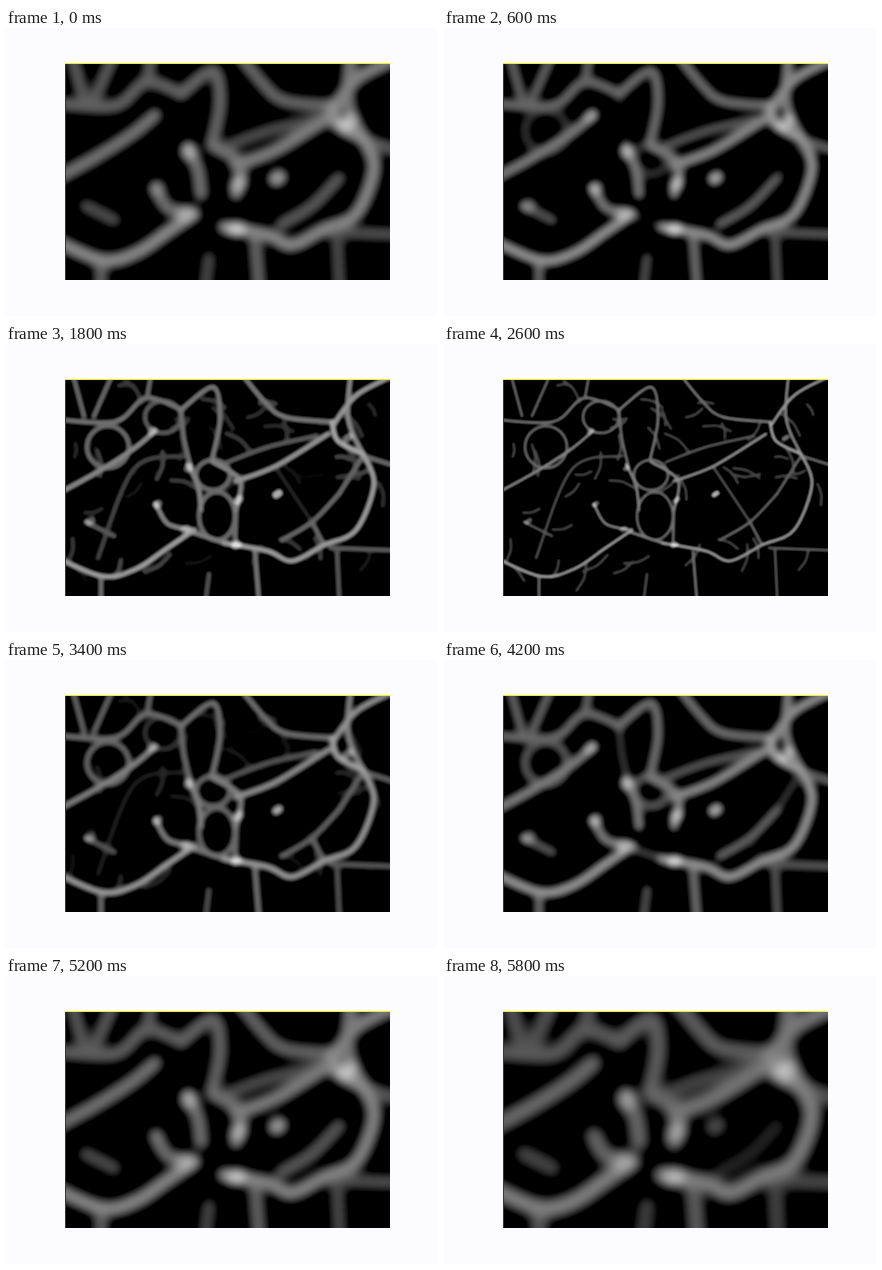
Animation, 432 px wide and 288 px high, one loop 6 s. Source, as an HTML page with a canvas:

```html
<!DOCTYPE html>
<html lang="en">
<head>
<meta charset="utf-8">
<title>Ridges at changing scale</title>
<style>
html, body { margin: 0; width: 100%; height: 100%; overflow: hidden; background: #fcfcff; }
canvas { display: block; }
</style>
</head>
<body>
<canvas id="stage" width="432" height="288"></canvas>
<script>
const W = 432, H = 288;
const BOX = [60, 36, 324, 216];
const STEP = 200, COUNT = 30, FINEST = 12.5;
const CUT = 17;

const stage = document.getElementById('stage').getContext('2d');
const layer = () => {
  const c = document.createElement('canvas');
  c.width = W;
  c.height = H;
  return c.getContext('2d', { willReadFrequently: true });
};
const sharp = layer(), soft = layer();
sharp.lineCap = sharp.lineJoin = 'round';

function seeded(seed) {
  return () => {
    seed = (seed * 1664525 + 1013904223) % 4294967296;
    return seed / 4294967296;
  };
}

// Smooth path through the points given as x, y, x, y ...
function through(p) {
  const path = new Path2D(), last = p.length / 2 - 1;
  const at = (i, axis) => p[2 * Math.max(0, Math.min(last, i)) + axis];
  const handle = (i, side, axis) =>
    at(i, axis) + side * (at(i + 1, axis) - at(i - 1, axis)) / 6;
  path.moveTo(p[0], p[1]);
  for (let i = 0; i < last; i++) {
    path.bezierCurveTo(
      handle(i, 1, 0), handle(i, 1, 1),
      handle(i + 1, -1, 0), handle(i + 1, -1, 1),
      at(i + 1, 0), at(i + 1, 1));
  }
  return path;
}

// ---- the network; reach is the scale at which a part has vanished ----
const parts = [];
const add = (path, level, reach, mode = 'lighten') => parts.push({ path, level, reach, mode });
const strand = (level, reach, ...p) => add(through(p), level, reach);
const spot = (x, y, level, reach) => add(through([x, y, x + 3, y - 2]), level, reach, 'lighter');
function ring(x, y, rx, ry, reach) {
  const path = new Path2D();
  path.ellipse(x, y, rx, ry, 0, 0, 2 * Math.PI);
  add(path, 72, reach);
}
const ALWAYS = 99;

// right half
strand(112, ALWAYS, 357, 110, 368, 140, 350, 186, 318, 201, 286, 217, 262, 207, 218, 199);
strand(108, ALWAYS, 400, 26, 352, 50, 328, 80);
strand(120, ALWAYS, 326, 78, 332, 97, 357, 110);
strand(95, ALWAYS, 346, 20, 342, 74, 357, 110);
strand(82, ALWAYS, 228, 20, 258, 57, 279, 73, 326, 78);
strand(105, ALWAYS, 322, 90, 270, 122, 230, 137);
strand(60, ALWAYS, 222, 118, 262, 103, 310, 92);
strand(70, ALWAYS, 358, 112, 405, 127);
strand(62, ALWAYS, 325, 204, 405, 207);
strand(58, ALWAYS, 331, 206, 334, 270);
strand(70, 18, 276, 196, 306, 178, 333, 150);
strand(70, 10, 333, 150, 357, 112);
strand(70, 9, 318, 201, 306, 178);
strand(55, 5, 306, 178, 270, 124);

// centre
strand(82, ALWAYS, 175, 66, 207, 43, 214, 75, 206, 116);
strand(92, ALWAYS, 182, 120, 192, 142, 195, 166);
strand(92, ALWAYS, 207, 118, 234, 136, 230, 166);
strand(80, ALWAYS, 249, 208, 254, 270);
strand(55, ALWAYS, 203, 230, 198, 270);
strand(75, 10, 175, 66, 178, 95, 184, 120);
strand(85, 10, 186, 188, 222, 200);
strand(75, 8, 230, 166, 229, 200);
ring(207, 131, 17, 15, 11);
ring(211, 172, 18, 24, 8);

// left half
strand(95, ALWAYS, 40, 156, 88, 130, 126, 106, 149, 87);
strand(115, ALWAYS, 40, 208, 95, 232, 130, 225, 160, 205, 188, 186);
strand(78, ALWAYS, 40, 74, 108, 78, 140, 54, 176, 66);
strand(70, ALWAYS, 78, 72, 64, 20);
strand(70, ALWAYS, 88, 72, 111, 20);
strand(70, ALWAYS, 141, 54, 147, 20);
strand(75, ALWAYS, 95, 232, 95, 270);
strand(90, ALWAYS, 150, 160, 162, 180, 188, 186);
strand(60, ALWAYS, 80, 178, 108, 192);
strand(55, 6, 92, 214, 128, 125, 178, 112);
ring(102, 103, 21, 21, 11);
ring(157, 73, 18, 16, 6);

spot(340, 95, 75, ALWAYS);
spot(229, 202, 70, ALWAYS);
spot(178, 186, 45, ALWAYS);
spot(181, 125, 60, ALWAYS);
spot(231, 157, 65, ALWAYS);
spot(270, 151, 130, 18);
spot(150, 161, 60, 14);
spot(83, 178, 60, 12);
spot(145, 88, 45, 12);

// fine fibres in the cells
const random = seeded(7);
for (let i = 0; i < 48; i++) {
  const x = 60 + 324 * random(), y = 36 + 216 * random();
  const turn = Math.PI * random(), size = 6 + 9 * random();
  const dx = size * Math.cos(turn), dy = size * Math.sin(turn);
  strand(48, 4 + 2.5 * random(), x - dx, y - dy, x + dy / 5, y - dx / 5, x + dx, y + dy);
}

// ---- drawing ----
const tone = v => v < CUT ? 0 : 255 * ((v - CUT) / (255 - CUT)) ** 0.75;

function draw(step) {
  const scale = Math.abs(step - FINEST);
  const width = 4 + 1.45 * scale;
  const gain = 1.3 - 0.02 * scale;

  sharp.globalCompositeOperation = 'source-over';
  sharp.fillStyle = '#000';
  sharp.fillRect(0, 0, W, H);
  for (const { path, level, reach, mode } of parts) {
    const fade = Math.max(0, Math.min(1, (reach - scale) / 3));
    if (!fade) continue;
    const v = Math.round(level * gain * fade);
    sharp.globalCompositeOperation = mode;
    sharp.strokeStyle = `rgb(${v},${v},${v})`;
    sharp.lineWidth = 0.62 * width + (mode === 'lighter' ? 2 : 0);
    sharp.stroke(path);
  }

  soft.filter = `blur(${0.2 * width}px)`;
  soft.drawImage(sharp.canvas, 0, 0);
  const image = soft.getImageData(...BOX), d = image.data;
  for (let i = 0; i < d.length; i += 4) {
    d[i] = d[i + 1] = d[i + 2] = tone(d[i]);
    d[i + 3] = 255;
  }
  stage.putImageData(image, BOX[0], BOX[1]);
}

// page and the thin edge of the picture
stage.fillStyle = '#fcfcff';
stage.fillRect(0, 0, W, H);
stage.fillStyle = '#3a3a10';
stage.fillRect(59, 36, 1, 216);
stage.fillStyle = '#f0ec20';
stage.fillRect(59, 35, 325, 1);

const start = performance.now();
let shown = -1;
function tick() {
  const step = Math.floor(Math.max(0, performance.now() - start) / STEP) % COUNT;
  if (step !== shown) draw(shown = step);
  requestAnimationFrame(tick);
}
tick();
</script>
</body>
</html>
```
